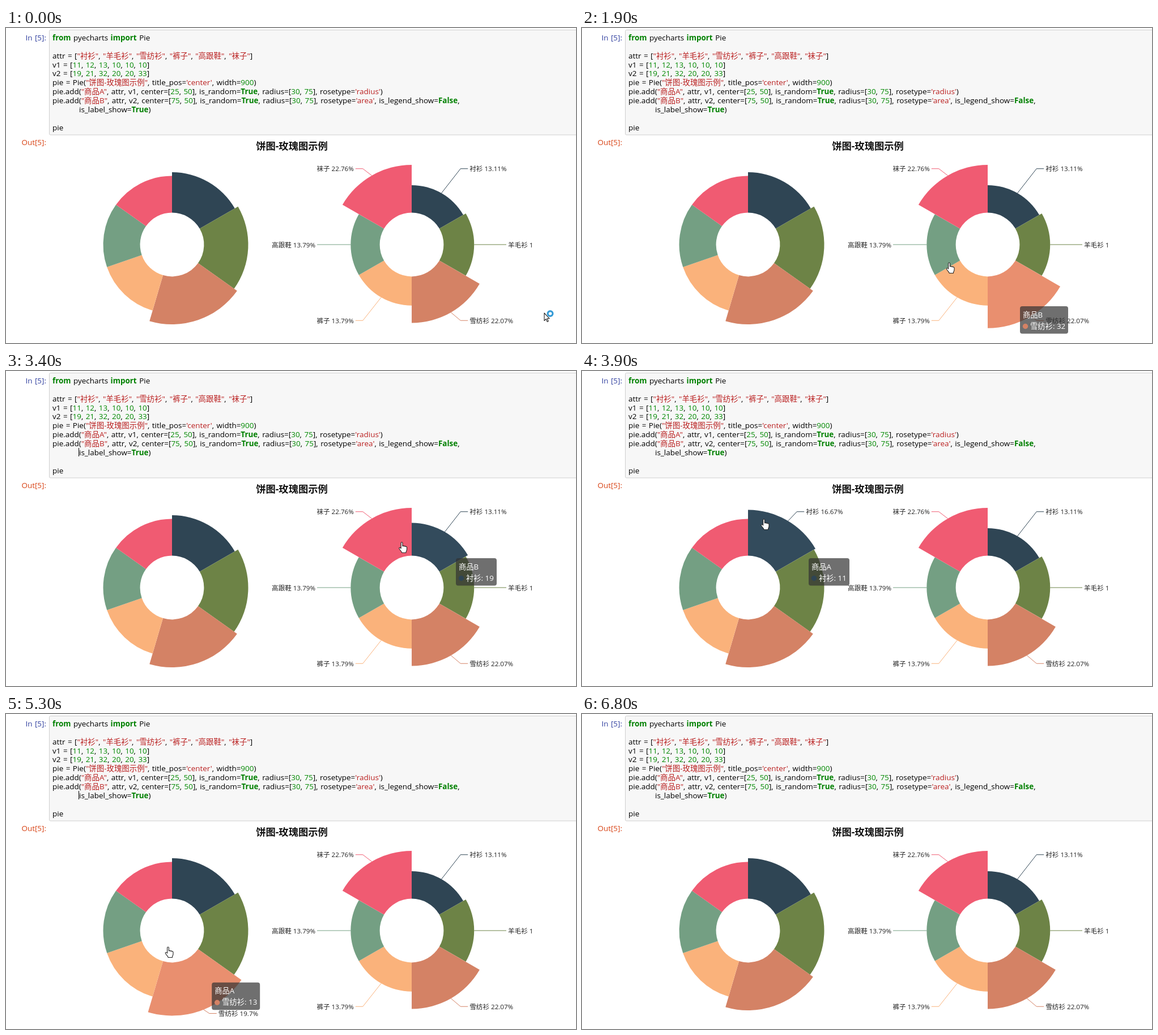
Write an HTML page that moves like this. It is 1006 px wide and 557 px high and loops after 7.1 s.

```html
<!DOCTYPE html>
<html lang="zh">
<head>
<meta charset="utf-8">
<title>Rose pie</title>
<style>
html, body { margin: 0; width: 100%; height: 100%; overflow: hidden; background: #fff; }
svg { display: block; width: 1006px; height: 557px; }
text { font-family: "Open Sans", "Noto Sans CJK SC", "Noto Sans CJK JP", "Noto Sans CJK", sans-serif; white-space: pre; }
.code { font-size: 13.45px; word-spacing: 1px; fill: #000; }
.kw { font-weight: 700; fill: #008000; }
.str { fill: #ba2121; }
.num { fill: #008800; }
.title { font-size: 17.3px; font-weight: 700; fill: #111; text-anchor: middle; }
.label { font-size: 11.6px; fill: #222; }
.line { fill: none; stroke-width: 1; }
.tip text { font-size: 13.3px; fill: #fff; }
.end { text-anchor: end; }
</style>
</head>
<body>
<svg viewBox="0 0 1006 557">
  <defs><clipPath id="chart"><rect x="81" y="195" width="847" height="362"/></clipPath></defs>
  <rect x="76.5" y="3.5" width="940" height="185.5" rx="2" fill="#f7f7f7" stroke="#cfcfcf"/>
  <text class="code end" x="71" y="22" style="fill:#303f9f">In [5]:</text>
  <text class="code end" x="71" y="207" style="fill:#d84315">Out[5]:</text>
  <g id="code"></g>
  <rect id="caret" x="128" y="136" width="1" height="15"/>
  <text class="title" x="504.5" y="214.5">饼图-玫瑰图示例</text>
  <g id="pies" clip-path="url(#chart)"></g>
  <g id="tip" class="tip">
    <rect height="48.5" rx="4" fill="#323232" fill-opacity=".7"/>
    <text x="5" y="19.5"></text>
    <circle cx="9.5" cy="35.5" r="4.7"/>
    <text x="18" y="39.5"></text>
  </g>
  <g id="cursor" stroke="#222" stroke-width="1.1" stroke-linejoin="round" fill="#fff">
    <path id="hand" d="M-1.4 10V1.4a1.4 1.4 0 0 1 2.8 0V7c.2-1 2.6-.9 2.8.4 .3-.9 2.5-.8 2.6.6 .4-.7 2.2-.5 2.2 1v3.5c0 2.5-1.6 3.2-1.6 6H.2c0-2-4.6-5.5-4.9-7.8 0-1.6 2-1.6 3.3.3z"/>
    <path id="arrow" d="M0 0V13.5l3.1-2.9 2.2 4.8 2-.9-2.2-4.7H9.2z"/>
    <circle id="busy" cx="10.5" cy="1" r="4.4" fill="none" stroke="#359bd6" stroke-width="3.2"/>
  </g>
</svg>
<script>
const LOOP = 7100, STEP = 100;
const $ = id => document.getElementById(id);

function add(parent, tag, attrs, text) {
  const el = document.createElementNS('http://www.w3.org/2000/svg', tag);
  for (const k in attrs) el.setAttribute(k, attrs[k]);
  if (text !== undefined) el.textContent = text;
  parent.appendChild(el);
  return el;
}

// Code cell
const code = `from pyecharts import Pie

attr = ["衬衫", "羊毛衫", "雪纺衫", "裤子", "高跟鞋", "袜子"]
v1 = [11, 12, 13, 10, 10, 10]
v2 = [19, 21, 32, 20, 20, 33]
pie = Pie("饼图-玫瑰图示例", title_pos='center', width=900)
pie.add("商品A", attr, v1, center=[25, 50], is_random=True, radius=[30, 75], rosetype='radius')
pie.add("商品B", attr, v2, center=[75, 50], is_random=True, radius=[30, 75], rosetype='area', is_legend_show=False,
        is_label_show=True)

pie`;
const token = /(["'].*?["'])|\b(from|import|True|False)\b|\b(\d+)\b|\w+|[^\w"']+/g;

function drawCode() {
  code.split('\n').forEach((line, row) => {
    const x = line.startsWith(' ') ? 129 : 82;
    const text = add($('code'), 'text', { class: 'code', x, y: 22 + row * 15.85 });
    for (const [all, str, kw, num] of line.trim().matchAll(token)) {
      add(text, 'tspan', { class: str ? 'str' : kw ? 'kw' : num ? 'num' : '' }, all);
    }
  });
}

// Rose charts
const items = ['衬衫', '羊毛衫', '雪纺衫', '裤子', '高跟鞋', '袜子'];
const colors = ['#2f4554', '#6d8346', '#d48265', '#fab27b', '#749f83', '#f05b72'];
const CY = 383, R0 = 56.4, R1 = 141, GROW = 9.4;
const pies = [
  { name: '商品A', cx: 293, values: [11, 12, 13, 10, 10, 10], byAngle: true },
  { name: '商品B', cx: 716, values: [19, 21, 32, 20, 20, 33], byAngle: false }
];

const lift = hex => 'rgb(' + [1, 3, 5].map(i =>
  Math.min(255, Math.floor(parseInt(hex.slice(i, i + 2), 16) * 1.1))) + ')';
const point = (cx, r, a) => [cx + r * Math.sin(a), CY - r * Math.cos(a)];

function sector(cx, r, a, b) {
  const p = (radius, angle) => point(cx, radius, angle).map(n => n.toFixed(2));
  return `M${p(R0, a)}L${p(r, a)}A${r} ${r} 0 0 1 ${p(r, b)}L${p(R0, b)}A${R0} ${R0} 0 0 0 ${p(R0, a)}Z`;
}

// Percentages with two decimals that add up to 100 (largest remainder).
function shares(values, sum) {
  const exact = values.map(v => v / sum * 1e4), parts = exact.map(Math.floor);
  const missing = 1e4 - parts.reduce((a, b) => a + b);
  exact.map((e, i) => [e - parts[i], i]).sort((a, b) => b[0] - a[0])
    .slice(0, missing).forEach(([, i]) => parts[i]++);
  return parts.map(p => p / 100);
}

// Label elbows lie on an ellipse around the pie.
function addNote(parent, cx, r, angle, color, label) {
  const dir = Math.sin(angle) > 0 ? 1 : -1, dy = -155 * Math.cos(angle);
  const x = cx + dir * 154 * Math.sqrt(1 - (dy / 162) ** 2), y = CY + dy;
  const note = add(parent, 'g', {});
  add(note, 'path', { class: 'line', stroke: color, d: `M${point(cx, r, angle)}L${x} ${y}h${13 * dir}` });
  add(note, 'text', { class: dir > 0 ? 'label' : 'label end', x: x + 16 * dir, y: y + 4.5 }, label);
  return note;
}

function buildPie(pie) {
  const sum = pie.values.reduce((a, b) => a + b), max = Math.max(...pie.values);
  const percent = shares(pie.values, sum);
  const notes = add($('pies'), 'g', {}), slices = add($('pies'), 'g', {});
  let angle = 0;
  pie.slices = pie.values.map((value, i) => {
    const a = angle, b = angle += 2 * Math.PI * (pie.byAngle ? value / sum : 1 / 6);
    const r = R0 + (R1 - R0) * value / max;
    const note = addNote(notes, pie.cx, r, (a + b) / 2, colors[i], `${items[i]} ${percent[i]}%`);
    return { a, b, r, note, path: add(slices, 'path', {}) };
  });
}

// Hovered slices: pie, item, from, to, and where the tooltip comes to rest
const hovers = [
  [1, 2, 700, 2000, 773, 492], [1, 4, 2000, 2400, 690, 473],
  [1, 5, 2500, 3000, 680, 310], [1, 0, 3000, 3500, 794, 331],
  [0, 0, 3600, 4400, 400, 331], [0, 1, 4400, 5100, 412, 416],
  [0, 2, 5100, 5800, 363, 475], [0, 3, 5800, 6100, 235, 480]
];
const tipStart = [398, 452];

// Pointer stops: time, x, y
const route = [
  [300, 950, 504], [700, 698, 431], [1100, 650, 413], [1900, 648, 415], [2400, 557, 330],
  [2800, 605, 239], [3300, 774, 311], [3900, 321, 262], [4200, 321, 262],
  [4900, 397, 395], [5300, 286, 412], [5600, 286, 412], [6400, -20, 562]
];

const mix = (p, q, k) => p.map((v, i) => v + (q[i] - v) * k);
const easeOut = k => 1 - (1 - Math.min(1, k)) ** 5;

function pointer(t) {
  const i = route.findIndex(p => p[0] > t);
  if (i === 0) return route[0].slice(1);
  if (i < 0) return route[route.length - 1].slice(1);
  const [p, q] = [route[i - 1], route[i]];
  return mix(p, q, (t - p[0]) / (q[0] - p[0])).slice(1);
}

const show = (el, on) => el.setAttribute('visibility', on ? 'visible' : 'hidden');
const place = (el, [x, y]) => el.setAttribute('transform', `translate(${x.toFixed(1)} ${y.toFixed(1)})`);

function drawTip(t, n) {
  show($('tip'), n >= 0);
  if (n < 0) return;
  const [p, i, from, , ...rest] = hovers[n], [box, head, dot, body] = $('tip').children;
  box.setAttribute('width', items[i].length > 2 ? 85 : 72);
  head.textContent = pies[p].name;
  dot.setAttribute('fill', colors[i]);
  body.textContent = `${items[i]}: ${pies[p].values[i]}`;
  place($('tip'), mix(n ? hovers[n - 1].slice(4) : tipStart, rest, easeOut((t - from) / 300)));
}

function draw(t) {
  const n = hovers.findIndex(h => t >= h[2] && t < h[3]);
  pies.forEach((pie, p) => pie.slices.forEach((s, i) => {
    const on = n >= 0 && hovers[n][0] === p && hovers[n][1] === i;
    s.path.setAttribute('d', sector(pie.cx, s.r + (on ? GROW : 0), s.a, s.b));
    s.path.setAttribute('fill', on ? lift(colors[i]) : colors[i]);
    show(s.note, p === 1 || on);
  }));
  drawTip(t, n);
  show($('caret'), t >= 3100 && t < 6800 && (t - 3090) % 1060 < 530);
  const hand = t >= 500 && t < 6100;
  show($('hand'), hand);
  show($('arrow'), !hand);
  show($('busy'), t < 500);
  place($('cursor'), pointer(t));
}

drawCode();
pies.forEach(buildPie);
draw(0);
const start = performance.now();
let last = 0;
function tick() {
  const t = Math.floor((performance.now() - start) % LOOP / STEP) * STEP;
  if (t !== last) draw(last = t);
  requestAnimationFrame(tick);
}
requestAnimationFrame(tick);
</script>
</body>
</html>
```
